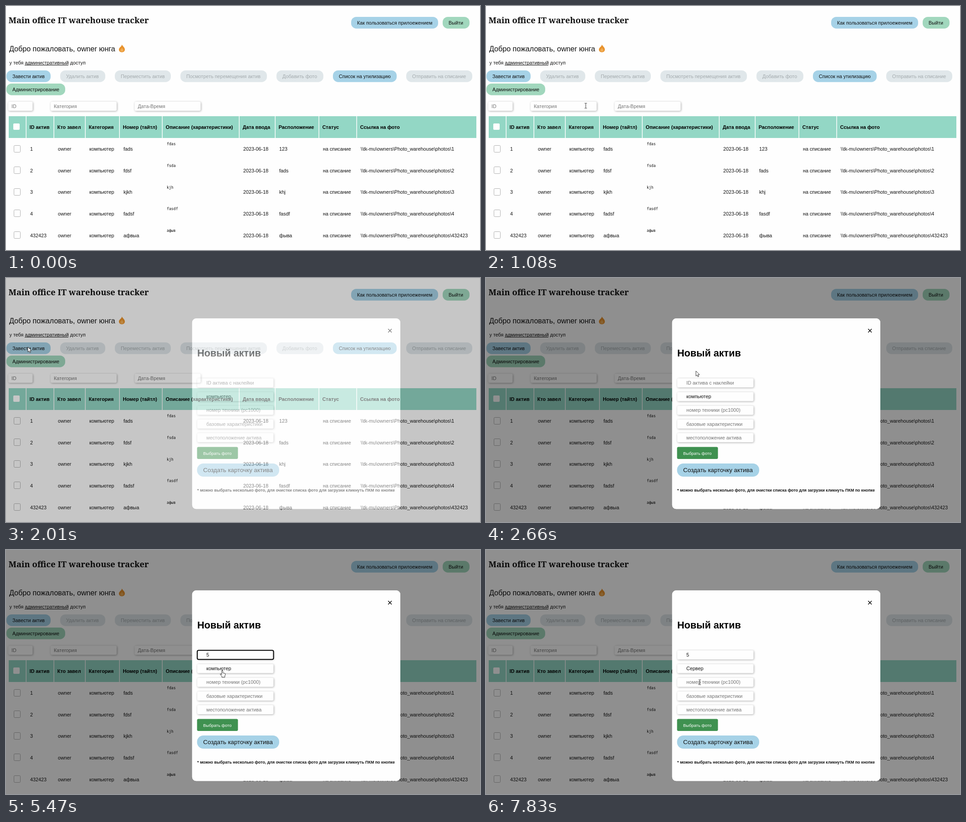
An HTML page with a canvas for the animation above (8000 ms loop, 1041 by 538 pixels).

```html
<!DOCTYPE html>
<html lang="ru">
<head>
<meta charset="utf-8">
<title>Warehouse tracker</title>
<style>
html, body { margin: 0; width: 100%; height: 100%; overflow: hidden; background: #fefefe }
canvas { display: block }
</style>
</head>
<body>
<canvas id="stage" width="1041" height="538"></canvas>
<script>
const W = 1041, H = 538, LOOP = 8000;
const BLUE = '#a6d2e7', GREEN = '#a1d7bd', TEAL = '#93d7c5', PAPER = '#fefefe', INK = '#111', HINT = '#757575';
const sans = size => size + 'px "Liberation Sans", Arial, sans-serif';
const BODY = sans(10.8), BOLD = 'bold ' + BODY;
const MONO = '8.2px "DejaVu Sans Mono", monospace';
const TITLE = '600 18.4px "Noto Serif", serif';

const screen = document.getElementById('stage').getContext('2d');
const layer = Object.assign(document.createElement('canvas'), { width: W, height: H }).getContext('2d');
let ctx = screen;

// y is the middle of the line box; the baseline sits on a whole pixel
function text(s, x, y, font = BODY, color = INK) {
  const size = parseFloat(font.match(/[\d.]+px/)[0]);
  ctx.font = font;
  ctx.fillStyle = color;
  ctx.fillText(s, x, Math.round(y + size * .3465));
}

function box(x1, y1, x2, y2, r, fill, stroke, width = 1) {
  ctx.beginPath();
  ctx.roundRect(x1, y1, x2 - x1, y2 - y1, r);
  if (fill) { ctx.fillStyle = fill; ctx.fill(); }
  if (stroke) { ctx.strokeStyle = stroke; ctx.lineWidth = width; ctx.stroke(); }
}

function pill(label, x1, x2, y, fill, color) {
  box(x1, y, x2, y + 25.7, 11.5, fill);
  text(label, x1 + 13, y + 13, BODY, color);
}

function field(x1, x2, y, label, pad, color = HINT, focused = false) {
  ctx.save();
  ctx.shadowColor = 'rgba(0,0,0,.32)';
  ctx.shadowBlur = 4;
  ctx.shadowOffsetX = ctx.shadowOffsetY = 1;
  box(x1, y, x2, y + 20, 3, PAPER);
  ctx.restore();
  if (focused) box(x1, y, x2, y + 20, 3, null, '#000', 2);
  text(label, x1 + pad, y + 10, BODY, color);
}

const edges = [6, 45, 106, 175, 250, 344, 513, 592, 688, 771, 1034.5];
const heads = ['ID актив', 'Кто завел', 'Категория', 'Номер (тайтл)', 'Описание (характеристики)',
  'Дата ввода', 'Расположение', 'Статус', 'Ссылка на фото'];
const rows = [
  ['1', 'fads', 'fdas', '123'],
  ['2', 'fdsf', 'fsda', 'fads'],
  ['3', 'kjkh', 'kjh', 'khj'],
  ['4', 'fadsf', 'fasdf', 'fasdf'],
  ['432423', 'афвыа', 'афыв', 'фыва']
];
const PITCH = 47.6;

function band(y1, y2, color) {
  ctx.fillStyle = color;
  for (let i = 0; i < 10; i++) ctx.fillRect(edges[i], y1, edges[i + 1] - edges[i] - 1.5, y2 - y1);
}

function drawTable(hovered) {
  band(243, 291, TEAL);
  box(16, 259, 30, 273, 2, PAPER);
  heads.forEach((h, i) => text(h, edges[i + 1] + 6.8, 267, BOLD, '#000'));
  rows.forEach(([id, title, note, place], i) => {
    const y = 315.5 + i * PITCH;
    if (i === hovered) {
      band(Math.round(y - 23), Math.round(y + 24), '#dce3e3');
      box(352, y - 18, 465, y + 15, 0, PAPER);
    }
    box(17.5, Math.round(y - 8) - .5, 31.5, Math.round(y + 6) + .5, 2, PAPER, '#b0b0b0');
    const cells = [id, 'owner', 'компьютер', title, '', '2023-06-18', place, 'на списание',
      '\\\\tk-mu\\owners\\Photo_warehouse\\photos\\' + id];
    cells.forEach((c, k) => text(c, edges[k + 1] + 8, y));
    text(note, 353, y - 11, MONO);
  });
}

function drop(x, y, width, height, color) {
  const side = width / 2, foot = y + height;
  ctx.fillStyle = color;
  ctx.beginPath();
  ctx.moveTo(x, y);
  ctx.bezierCurveTo(x + side * .3, y + height * .25, x + side, y + height * .35, x + side, y + height * .65);
  ctx.bezierCurveTo(x + side, foot + height * .12, x - side, foot + height * .12, x - side, y + height * .65);
  ctx.bezierCurveTo(x - side, y + height * .35, x - side * .1, y + height * .3, x, y);
  ctx.fill();
}

function drawPage(hovered) {
  ctx.fillStyle = PAPER;
  ctx.fillRect(0, 0, W, H);
  text('Main office IT warehouse tracker', 5.5, 31.5, TITLE);
  pill('Как пользоваться прилоежением', 758, 949, 24, BLUE);
  pill('Выйти', 959, 1018, 24, GREEN);
  text('Добро пожаловать, owner юнга', 7, 94, sans(16.1));
  drop(254.5, 85, 13, 17, '#e8922c');
  drop(254.5, 92, 7, 9, '#f0ad55');
  text('у тебя административный доступ', 7.5, 125);
  ctx.fillRect(41, 130, 96, 1);
  const actions = [['Завести актив', 1, 98, 1], ['Удалить актив', 119, 218], ['Переместить актив', 239, 362],
    ['Посмотреть перемещения актив', 383, 573], ['Добавить фото', 594, 697],
    ['Список на утилизацию', 718, 858, 1], ['Отправить на списание', 879, 1024]];
  for (const [label, x1, x2, on] of actions) pill(label, x1, x2, 142, on ? BLUE : '#e0e7ea', on ? INK : '#a3aaad');
  pill('Администрирование', 1, 130, 171, GREEN);
  field(5, 58.5, 211, 'ID', 7);
  field(98, 243, 211, 'Категория', 7);
  field(282.5, 427.5, 211, 'Дата-Время', 7);
  drawTable(hovered);
}

const kinds = ['компьютер', 'Ноутбук', 'Сервер', 'Принтер', 'Монитор', 'Другое'];

function drawList(cursorY) {
  const step = 14.2, top = 272;
  box(419.5, top + .5, 587.5, 357.5, 0, PAPER, '#767676');
  const picked = Math.max(0, Math.floor((cursorY - top) / step));
  kinds.forEach((k, i) => {
    const y = top + 1 + i * step;
    if (i === picked) box(420, y, 587, y + step - .5, 0, '#1e78d7');
    text(k, 440, y + 6.5, BODY, i === picked ? '#fff' : INK);
  });
}

function drawDialog(t) {
  const typed = t >= 4730, open = t >= 5540 && t < 7000;
  box(408.8, 89, 866, 509.3, 9, PAPER);
  ctx.strokeStyle = '#111';
  ctx.lineWidth = 1.6;
  ctx.beginPath();
  ctx.moveTo(839.3, 112.3); ctx.lineTo(847, 120);
  ctx.moveTo(847, 112.3); ctx.lineTo(839.3, 120);
  ctx.stroke();
  text('Новый актив', 420, 166, 'bold ' + sans(21.6), '#000');

  const inputs = [
    [typed ? '5' : 'ID актива с наклейки', typed, t >= 3180 && t < 5540],
    [t < 7000 ? 'компьютер' : 'Сервер', true, open],
    ['номер техники (pc1000)'], ['базовые характеристики'], ['местоположение актива']
  ];
  inputs.forEach(([s, filled, focused], i) => field(420, 587.5, 221.3 + i * 30.2, s, 20, filled ? INK : HINT, focused));

  const caret = (t >= 3180 && t < 3740) || (t >= 4240 && t < 5230);
  if (caret) { ctx.fillStyle = '#000'; ctx.fillRect(typed ? 446 : 440, 225, 1, 12); }

  box(419.6, 372.5, 509.4, 399, 3, '#3f9150');
  text('Выбрать фото', 433, 386.5, sans(9.4), '#fff');
  box(419.6, 409, 600, 438, 14, BLUE);
  text('Создать карточку актива', 433, 423.5, sans(13.35));
  text('* можно выбрать несколько фото, для очистки списка фото для загрузки кликнуть ПКМ по кнопке',
    420, 468, 'bold ' + sans(8.9));
  if (open) drawList(pointer(t)[1]);
}

// pointer path: time, x, y
const path = [
  [120, 760, 530], [270, 728, 430], [420, 687, 335], [720, 535, 288], [870, 315, 241], [1080, 219.5, 220],
  [1500, 48, 152], [2080, 48, 152], [2660, 461, 205], [2740, 461, 205], [2880, 481.5, 231],
  [4880, 481.5, 231], [5250, 475, 265], [6180, 475, 265], [6470, 467.5, 308], [7480, 467.5, 308], [7830, 469.5, 291.5]
];

function pointer(t) {
  const i = path.findIndex(p => p[0] > t);
  if (i < 1) return path[i < 0 ? path.length - 1 : 0].slice(1);
  const [t0, x0, y0] = path[i - 1], [t1, x1, y1] = path[i], k = (t - t0) / (t1 - t0);
  return [x0 + (x1 - x0) * k, y0 + (y1 - y0) * k];
}

const arrow = new Path2D('M0 0V11.2L2.6 8.9L4.3 12.8L6.2 12L4.5 8.1H8Z');
const beam = new Path2D('M-2.5 -5.5H-.7L0 -5L.7 -5.5H2.5M0 -5V5M-2.5 5.5H-.7L0 5L.7 5.5H2.5');
const hand = new Path2D('M-1.2 10V1Q0 -.6 1.2 1V6L6 7.2Q7 7.6 6.8 9L5.6 13V15.5H-1V13.5L-4.6 9Q-4.4 7.4 -2.8 8.3Z');

function drawPointer(t) {
  if (t < 120 || (t >= 4450 && t < 4880)) return;
  const [x, y] = pointer(t);
  const within = (a, b) => t >= a && t < b;
  const shape = within(1030, 1130) || within(2800, 5060) || t >= 7700 ? beam
    : within(5060, 6200) ? hand : arrow;
  ctx.save();
  ctx.translate(x, y);
  ctx.lineWidth = .9;
  ctx.lineJoin = 'round';
  ctx.strokeStyle = '#222';
  ctx.fillStyle = '#fff';
  if (shape !== beam) ctx.fill(shape);
  ctx.stroke(shape);
  ctx.restore();
}

function render(t) {
  const rowY = pointer(t - 40)[1];
  const hovered = t >= 120 && t < 870 ? Math.floor((rowY - 292) / PITCH) : -1;
  ctx = screen;
  drawPage(hovered);
  const shown = Math.min(1, Math.max(0, (t - 1860) / 300));
  if (shown) {
    // the dimming surrounds the dialog and leaves its own area clear
    ctx.fillStyle = `rgba(0,0,0,${.44 * shown})`;
    ctx.beginPath();
    ctx.rect(0, 0, W, H);
    ctx.roundRect(408.8, 89, 457.2, 420.3, 9);
    ctx.fill('evenodd');
    ctx = layer;
    ctx.clearRect(0, 0, W, H);
    drawDialog(t);
    ctx = screen;
    ctx.globalAlpha = shown;
    ctx.drawImage(layer.canvas, 0, 0);
    ctx.globalAlpha = 1;
  }
  drawPointer(t);
}

const start = performance.now();
function tick() {
  render((performance.now() - start) % LOOP);
  requestAnimationFrame(tick);
}
tick();
</script>
</body>
</html>
```
